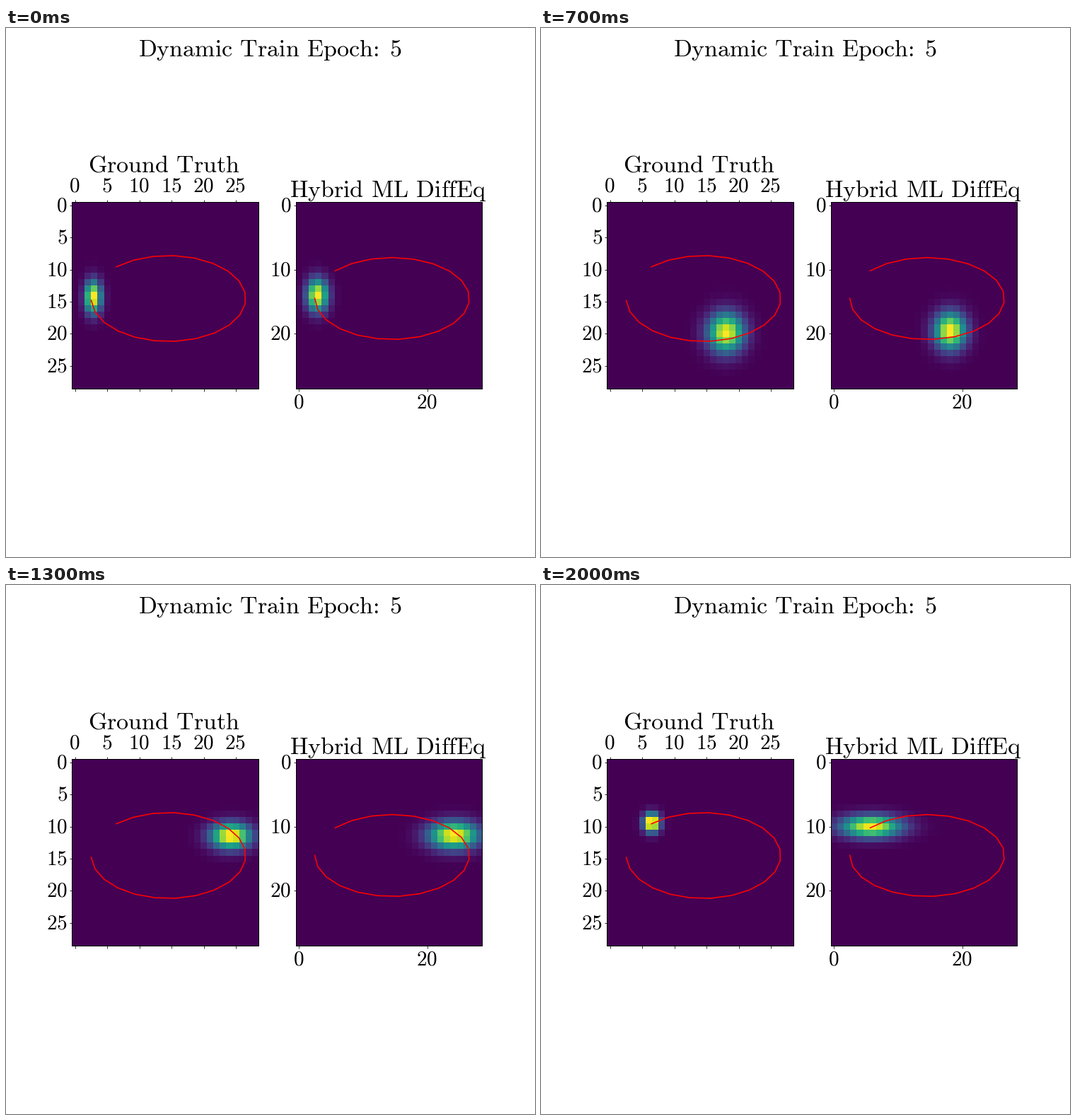
Recreate the animation shown at these times as a matplotlib script. Size 748 by 748 pixels, loop 2100 ms.

```python
import numpy as np
import matplotlib.pyplot as plt
from matplotlib.animation import FuncAnimation

plt.rcParams["mathtext.fontset"] = "cm"

SIZE, DPI = 748, 88
PT = 72 / DPI            # points per pixel
STEPS, CELLS = 21, 29
TITLE, LABEL = 34, 29.3

fig, (left, right) = plt.subplots(1, 2, figsize=(SIZE / DPI, SIZE / DPI), dpi=DPI)
fig.set_facecolor("white")
fig.subplots_adjust(left=0.1249, bottom=0.1095)

t = np.arange(STEPS)
grid = np.arange(CELLS)


def roman(s):
    s = s.replace(": ", r"\hspace{-0.2}:\hspace{0.3}").replace(" ", r"\hspace{0.38}")
    return rf"$\mathrm{{{s}}}$"


def label(x, y, s, size=LABEL, ha="center", va="center"):
    fig.text(x / SIZE, 1 - y / SIZE, roman(s), fontsize=size * PT,
             ha=ha, va=va, color="black")


def title(x, y, s):
    label(x, y, s, TITLE, va="baseline")


def orbit(start, step, ry):
    a = np.radians(start - step * t)
    return 14.5 + 12.03 * np.cos(a), 14.5 + ry * np.sin(a)


def bell(center, width):
    return np.exp(-0.5 * ((grid - center) / width) ** 2)


class Panel:
    """Red orbit with a soft spot that follows it and changes its widths."""

    def __init__(self, ax, path, sx, sy):
        self.cx, self.cy = (14 + 0.93 * (p - 14.5) for p in path)
        self.sx, self.sy = sx, sy
        self.img = ax.imshow(self.field(0), cmap="viridis", vmin=0, vmax=1,
                             interpolation="nearest")
        ax.plot(*path, color="red", lw=1.6 * PT)
        ax.set_xlim(-0.5, CELLS - 0.5)
        ax.set_ylim(CELLS - 0.5, -0.5)
        for spine in ax.spines.values():
            spine.set_linewidth(PT)

    def field(self, i):
        z = np.outer(bell(self.cy[i], self.sy[i]), bell(self.cx[i], self.sx[i]))
        return z / z.max()

    def show(self, i):
        self.img.set_data(self.field(i))
        return self.img


# Widths: heights swing slowly, the left spot bulges midway, the right one grows
swing = np.cos(2 * np.pi * (t - 5.3) / 26)
bulge = np.sin(np.pi / 2 * np.sin(np.pi * (t - 1.2) / 20) ** 2)
growth = np.sin(np.pi * t / 40) ** 2

panels = [
    Panel(left, orbit(177.4, 15.49, 6.68), 0.78 + 1.36 * bulge, 1.53 + 0.6 * swing),
    Panel(right, orbit(180.2, 15.88, 6.37), 1.1 + 2.1 * growth, 1.57 + 0.43 * swing),
]

CELL = SIZE * 0.775 / 2.2 / CELLS
TOP = 251.2              # label height of the first row


def ticks(ax, x0, label_y, right_x, xs, ys):
    ax.set_xticks(xs)
    ax.set_yticks(ys)
    ax.tick_params(length=3.5 * PT, width=0.8 * PT, labelleft=False,
                   labelbottom=False, top=ax is left)
    for v in xs:
        label(x0 + v * CELL, label_y, str(v))
    for v in ys:
        label(right_x, TOP + v * CELL, str(v), ha="right")


ticks(left, 97.2, 223.3, 86.8, range(0, 26, 5), range(0, 26, 5))
ticks(right, 413.5, 529.3, 403, range(0, 21, 20), range(0, 21, 10))

title(373, 40, "Dynamic Train Epoch: 5")
title(223.3, 204, "Ground Truth")
title(540.5, 239, "Hybrid ML DiffEq")


def update(i):
    return [p.show(i) for p in panels]


anim = FuncAnimation(fig, update, frames=STEPS, interval=100,
                     repeat=True, repeat_delay=0, blit=False)
plt.show()
```
